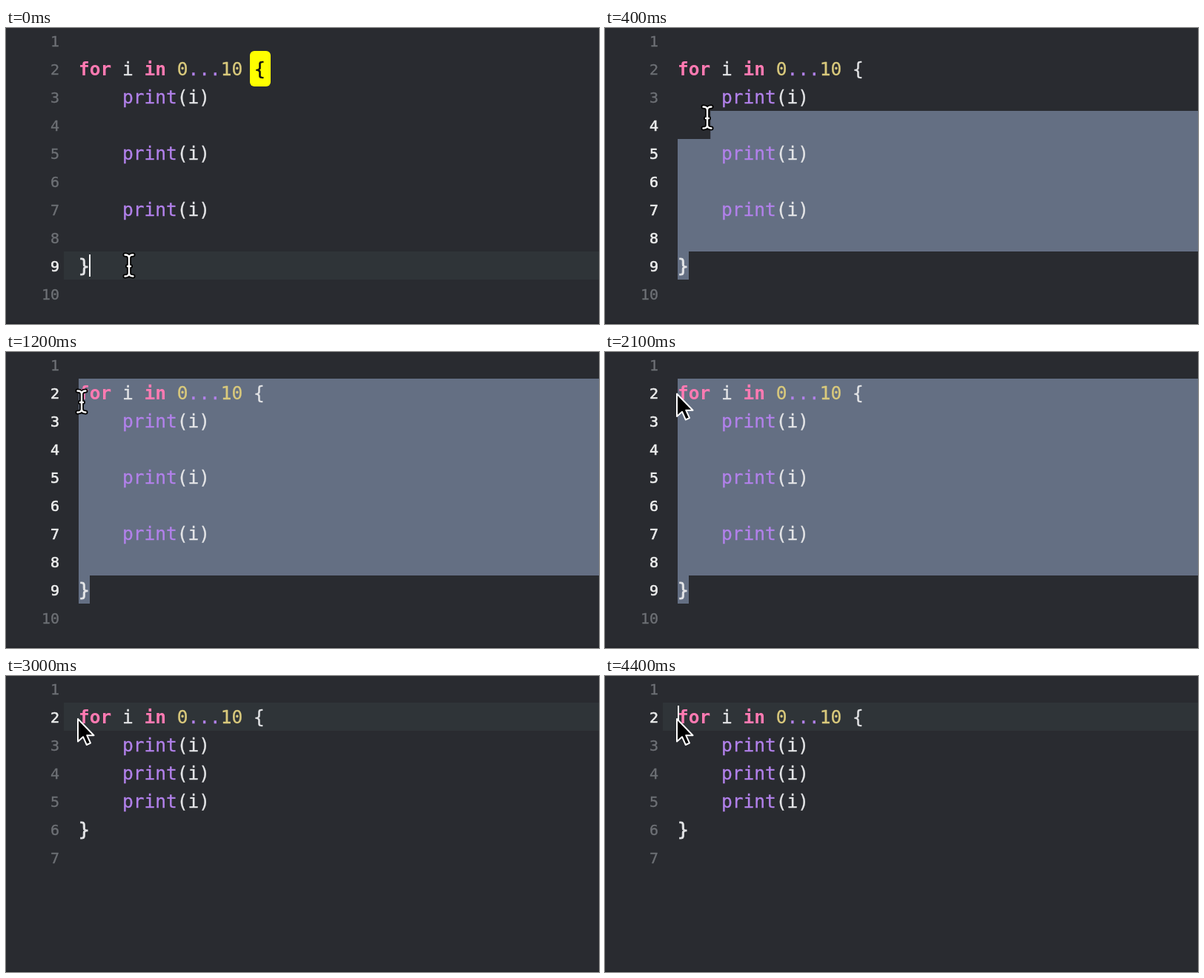
Write an HTML page that moves like this. It is 800 px wide and 400 px high and loops after 4.5 s.

```html
<!DOCTYPE html>
<html lang="en">
<head>
<meta charset="utf-8">
<title>Removing blank lines</title>
<style>
  html, body { margin: 0; width: 100%; height: 100%; overflow: hidden; background: #292b30; }
  svg { display: block; width: 800px; height: 400px; }
  text { font-family: "DejaVu Sans Mono", "Noto Sans Mono", monospace; white-space: pre; }
  .code { font-size: 24.5px; fill: #e4e5e7; stroke: #e4e5e7; stroke-width: .3px; }
  .key { font-weight: bold; fill: #ff7ab2; stroke: none; }
  .num { fill: #d9c97c; stroke: #d9c97c; }
  .call { fill: #b281eb; stroke: #b281eb; }
  .brace { stroke-width: .8px; }
  .no { font-size: 20px; text-anchor: end; fill: #6d7075; stroke: #6d7075; stroke-width: .35px; }
  .no.on { fill: #eceded; stroke: #eceded; stroke-width: .6px; }
  #match text { fill: #111; stroke: #111; stroke-width: .6px; }
</style>
</head>
<body>
<svg viewBox="0 0 800 400">
  <rect width="800" height="400" fill="#292b30"/>
  <rect y="398.5" width="800" height="1.5" fill="#222428"/>
  <rect id="row" x="78" width="722" height="38" fill="#2f3438"/>
  <path id="selection" fill="#646f83"/>
  <g id="spaced"></g>
  <g id="compact"></g>
  <g id="match">
    <rect x="329" y="31" width="28" height="48" rx="6" fill="#ff0"/>
    <text class="code" x="335" y="64">{</text>
  </g>
  <rect id="caret" width="2" height="30" fill="#fff"/>
  <g id="beam" fill="none" stroke-linecap="round" stroke-linejoin="round">
    <g id="beamShape" stroke="#000" stroke-width="6">
      <path d="M-5.5-14.5Q0-14.5 0-10Q0-14.5 5.5-14.5M0-10V10M-5.5 14.5Q0 14.5 0 10Q0 14.5 5.5 14.5M-2 1H2"/>
    </g>
    <path stroke="#fff" stroke-width="2.4" d="M-5.5-14.5Q0-14.5 0-10Q0-14.5 5.5-14.5M0-10V10M-5.5 14.5Q0 14.5 0 10Q0 14.5 5.5 14.5M-2 1H2"/>
  </g>
  <path id="arrow" d="M0 0V30.5L7 24.2L11.8 35L17 32.7L12.2 22.2H21.5Z"
        fill="#000" stroke="#fff" stroke-width="2" stroke-linejoin="round"/>
</svg>
<script>
const LEFT = 98, CHAR = 14.75, ROW = 38, LOOP = 4500, STEP = 100;
const COLLAPSE = 2200, ARROW = 1800;
const $ = id => document.getElementById(id);
const rowTop = line => (line - 1) * ROW - 2;
const colX = col => LEFT + col * CHAR;

// Each token: column, style, text
const HEAD = [[0, 'key', 'for'], [4, '', 'i'], [6, 'key', 'in'], [9, 'num', '0'],
              [10, 'call', '...'], [13, 'num', '10'], [16, '', '{']];
const PRINT = [[4, 'call', 'print'], [9, '', '(i)']];
const END = [[0, 'brace', '}']];

function build(id, lines) {
  $(id).innerHTML = lines.map((tokens, i) => {
    const y = rowTop(i + 1) + 28;
    return `<text class="no" x="72" y="${y - 1}">${i + 1}</text>` +
      tokens.map(([col, style, text]) =>
        `<text class="code ${style}" x="${colX(col)}" y="${y}">${text}</text>`).join('');
  }).join('');
  return [...$(id).querySelectorAll('.no')];
}
const spacedNos = build('spaced', [[], HEAD, PRINT, [], PRINT, [], PRINT, [], END, []]);
const compactNos = build('compact', [[], HEAD, PRINT, PRINT, PRINT, END, []]);

// Drag path of the text pointer, one point per step
const DRAG = [[166, 321], [164, 280], [159, 229], [151, 175], [138, 121], [118, 89], [102, 67]];

const show = (id, on) => $(id).style.display = on ? '' : 'none';
const place = (id, x, y) => $(id).setAttribute('transform', `translate(${x} ${y})`);
const light = (nos, from, to) =>
  nos.forEach((n, i) => n.classList.toggle('on', i + 1 >= from && i + 1 <= to));

function selectionPath(line, col) {
  const x = colX(col), y = rowTop(line), last = rowTop(9);
  return `M${x} ${y}H800V${last}H113V${last + ROW}H${LEFT}V${y + ROW}H${x}Z`;
}

function draw(t) {
  const idle = t < STEP, done = t >= COLLAPSE, selecting = !idle && !done;
  const [px, py] = DRAG[Math.min(t / STEP, DRAG.length - 1)];
  const line = Math.floor((py + 2) / ROW) + 1;
  const col = Math.min(4, Math.max(0, Math.round((px - LEFT) / CHAR)));

  show('spaced', !done);
  show('compact', done);
  show('match', idle);
  show('row', !selecting);
  show('selection', selecting);
  if (selecting) $('selection').setAttribute('d', selectionPath(line, col));
  light(spacedNos, idle ? 9 : line, 9);
  light(compactNos, 2, 2);

  const active = done ? 2 : 9;
  $('row').setAttribute('y', rowTop(active));
  $('caret').setAttribute('x', done ? 98 : 112);
  $('caret').setAttribute('y', rowTop(active) + 4);
  const blinkOn = t < 2800 || (t >= 3300 && t < 3800) || t >= 4400;
  show('caret', idle || (done && blinkOn));

  show('beam', t < ARROW);
  show('arrow', t >= ARROW);
  place('beam', px, py);
  place('arrow', 97, done ? 58 : 56.5);
}

const start = performance.now();
function tick() {
  const t = (performance.now() - start) % LOOP;
  draw(Math.floor(t / STEP) * STEP);
  requestAnimationFrame(tick);
}
tick();
</script>
</body>
</html>
```
